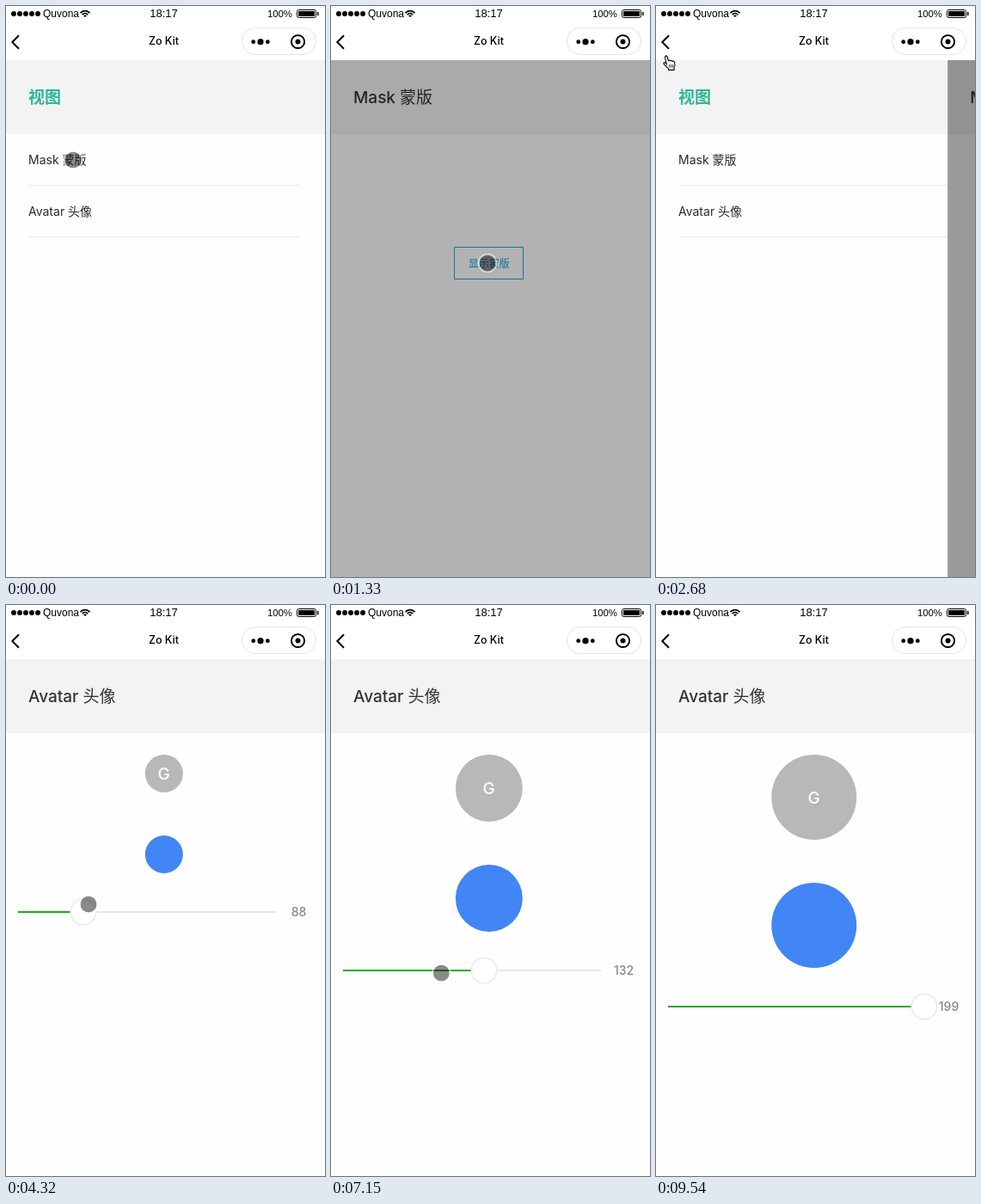
An HTML page with a canvas that plays this animation: 371 by 664 pixels, repeating every 9.84 s.

```html
<!DOCTYPE html>
<html lang="zh">
<head>
<meta charset="utf-8">
<style>
  html, body { margin: 0; width: 100%; height: 100%; overflow: hidden; background: #fff; }
  canvas { display: block; }
</style>
</head>
<body>
<canvas id="stage" width="371" height="664"></canvas>
<script>
const W = 371, H = 664, TOP = 63;
const LOOP = 9840, STEPS = 66;
const ctx = document.getElementById('stage').getContext('2d');
const SANS = '"Liberation Sans", Arial, sans-serif';
const UI = 'Inter, "Noto Sans CJK SC", "Noto Sans CJK", sans-serif';
const TITLE = '500 19px ' + UI;

const progress = (step, from, to) => Math.min(1, Math.max(0, (step - from) / (to - from)));
const smooth = p => p * p * (3 - 2 * p);
const pageSlide = (step, from) => W * smooth(progress(step, from, from + 2.44));

// Each move: first step, last step, where the pointer ends up.
const pointerMoves = [
  [3, 8, 182, 299],    // to the mask button
  [10, 14, 6, 41],     // to the back arrow
  [16, 18, 8, 57],
  [18, 21, 85, 239],   // to the avatar entry
  [25, 29, 96, 348],   // to the slider knob
  [29, 32, 164, 346],  // first drag
  [33, 35, 172, 376],
  [36, 38, 238, 378],
  [39, 44, 229, 428],  // tap on the track
  [46, 49, 78, 428],   // drag left
  [52, 59, 311, 367],  // drag to the end
  [59, 61, 267, 655],
  [62, 63, 284, 632]
];
const sliderMoves = [[29, 31, 125], [39, 40, 157], [47, 50, 82], [52, 58, 199]];

function follow(start, moves, step) {
  return moves.reduce((pos, [from, to, ...goal]) => {
    const p = progress(step, from, to);
    return pos.map((v, i) => v + (goal[i] - v) * p);
  }, start);
}

const sliderValue = step => Math.round(follow([88], sliderMoves, step)[0]);

function text(str, x, y, font, color, align = 'left') {
  ctx.font = font;
  ctx.fillStyle = color;
  ctx.textAlign = align;
  ctx.fillText(str, x, y);
}

function rect(x, y, w, h, color) {
  ctx.fillStyle = color;
  ctx.fillRect(x, y, w, h);
}

function disc(x, y, r, color) {
  ctx.beginPath();
  ctx.arc(x, y, r, 0, Math.PI * 2);
  ctx.fillStyle = color;
  ctx.fill();
}

function ring(x, y, r, width, color, from = 0, to = Math.PI * 2) {
  ctx.beginPath();
  ctx.arc(x, y, r, from, to);
  ctx.lineWidth = width;
  ctx.strokeStyle = color;
  ctx.stroke();
}

function roundOutline(x, y, w, h, r, color) {
  ctx.beginPath();
  ctx.roundRect(x, y, w, h, r);
  ctx.lineWidth = 1;
  ctx.strokeStyle = color;
  ctx.stroke();
}

function statusBar() {
  rect(0, 0, W, TOP, '#fff');
  for (let i = 0; i < 5; i++) disc(9 + 7 * i, 9, 3, '#000');
  text('Quvona', 43, 13, '12px ' + SANS, '#000');
  text('18:17', 183.5, 13, '13px ' + SANS, '#000', 'center');
  text('100%', 304, 13, '11.3px ' + SANS, '#000');

  for (const r of [1.3, 4.3, 7.3]) {
    ring(92, 13, r, r < 2 ? 2.6 : 1.7, '#000', -Math.PI * 0.77, -Math.PI * 0.23);
  }
  roundOutline(338.5, 4.5, 22, 9, 2, '#000');
  rect(340, 6, 19, 6, '#000');
  rect(362, 7, 1.5, 4, '#000');
}

function navBar() {
  ctx.strokeStyle = '#000';
  ctx.lineWidth = 2;
  ctx.beginPath();
  ctx.moveTo(15, 34.3);
  ctx.lineTo(7.3, 42);
  ctx.lineTo(15, 49.7);
  ctx.stroke();
  text('Zo Kit', 183.5, 45, '500 12.5px Inter, sans-serif', '#000', 'center');

  roundOutline(274.5, 25.5, 86, 31, 15.5, '#e4e4e4');
  for (const side of [-1, 0, 1]) disc(296 + 8.3 * side, 41.7, side ? 2.4 : 3.6, '#000');
  ring(339.5, 41.5, 7.6, 2, '#000');
  disc(339.5, 41.5, 3, '#000');
}

function pageBase(title, font, color) {
  rect(0, TOP, W, H - TOP, '#fefefe');
  rect(0, TOP, W, 86, '#f3f3f3');
  text(title, 26, 113, font, color);
}

function listPage() {
  pageBase('视图', 'bold 19px "Noto Sans CJK SC", "Noto Sans CJK", sans-serif', '#2ab795');
  ['Mask 蒙版', 'Avatar 头像'].forEach((label, i) => {
    text(label, 26, 184 + 60 * i, '14px ' + UI, '#2b2b2b');
    rect(26, 208 + 60 * i, 315, 1, '#e9e9e9');
  });
}

function maskPage(step) {
  pageBase('Mask 蒙版', TITLE, '#333');
  roundOutline(143.5, 280.5, 80, 37, 0, '#08abec');
  text('显示蒙版', 183.7, 304, '12px ' + UI, '#08abec', 'center');
  const p = progress(step, 8, 10);
  rect(0, TOP, W, H - TOP, `rgba(0,0,0,${0.4 * p * (2 - p)})`);
}

function avatarPage(step) {
  const value = sliderValue(step);
  // The avatars resize one step behind the slider.
  const size = Math.ceil(sliderValue(step - 1) * W / 750);
  const sliderY = 269 + 2 * size;
  const knobX = 14 + (value - 50) * 2;

  pageBase('Avatar 头像', TITLE, '#333');
  disc(183.8, 174 + size / 2, size / 2, '#b8b8b8');
  text('G', 183.5, 181 + size / 2, '500 19px ' + UI, '#fff', 'center');
  disc(183.8, 224 + size * 1.5, size / 2, '#4285f4');

  rect(14, sliderY - 1, 300, 2, '#e8e8e8');
  rect(14, sliderY - 1, knobX - 14, 2, '#1fad1a');
  disc(knobX, sliderY, 15, '#fff');
  ring(knobX, sliderY, 14.8, 1.5, '#e9e9e9');
  text(String(value), 340.5, sliderY + 5, '500 14px ' + UI, '#888', 'center');
}

const hand = new Path2D('M4.2 10.5L2.6 3.4Q2.3 1 3.9 .9Q5 .9 5.5 3L6.4 6.6Q7.6 5.4 8.7 6.8Q10 5.8 11 7.4' +
  'Q13 6.6 13.6 8.6Q14.6 12 13 14.6V17.4H6.6V15.8Q4 13.6 1.2 10.6Q.4 9 1.8 8.7Q3 8.9 4.2 10.5Z');
const knuckles = new Path2D('M7.6 11v3.6M9.6 11v3.6M11.6 11v3.6');

function pointer(step) {
  if (step >= 64) return;
  const [x, y] = follow([78, 179], pointerMoves, step);
  if (y >= TOP) {
    disc(x, y, 9.5, 'rgba(0,0,0,.46)');
    ring(x, y, 10.4, 1.8, 'rgba(255,255,255,.5)');
    return;
  }
  ctx.save();
  ctx.translate(x, y);
  ctx.fillStyle = '#fff';
  ctx.strokeStyle = '#000';
  ctx.lineWidth = 1.1;
  ctx.fill(hand);
  ctx.stroke(hand);
  ctx.lineWidth = 0.8;
  ctx.stroke(knuckles);
  ctx.restore();
}

function showAt(x, page, step) {
  ctx.save();
  ctx.translate(x, 0);
  page(step);
  ctx.restore();
}

function draw(now) {
  // The screen advances in even steps; the small lead absorbs rounding.
  const step = Math.floor((now % LOOP + 15) / (LOOP / STEPS)) % STEPS;
  listPage();
  showAt(W - pageSlide(step, 1) + pageSlide(step, 16), maskPage, step);
  showAt(W - pageSlide(step, 22), avatarPage, step);
  statusBar();
  navBar();
  pointer(step);
}

const start = performance.now();
function tick() {
  draw(performance.now() - start);
  requestAnimationFrame(tick);
}
tick();
</script>
</body>
</html>
```
